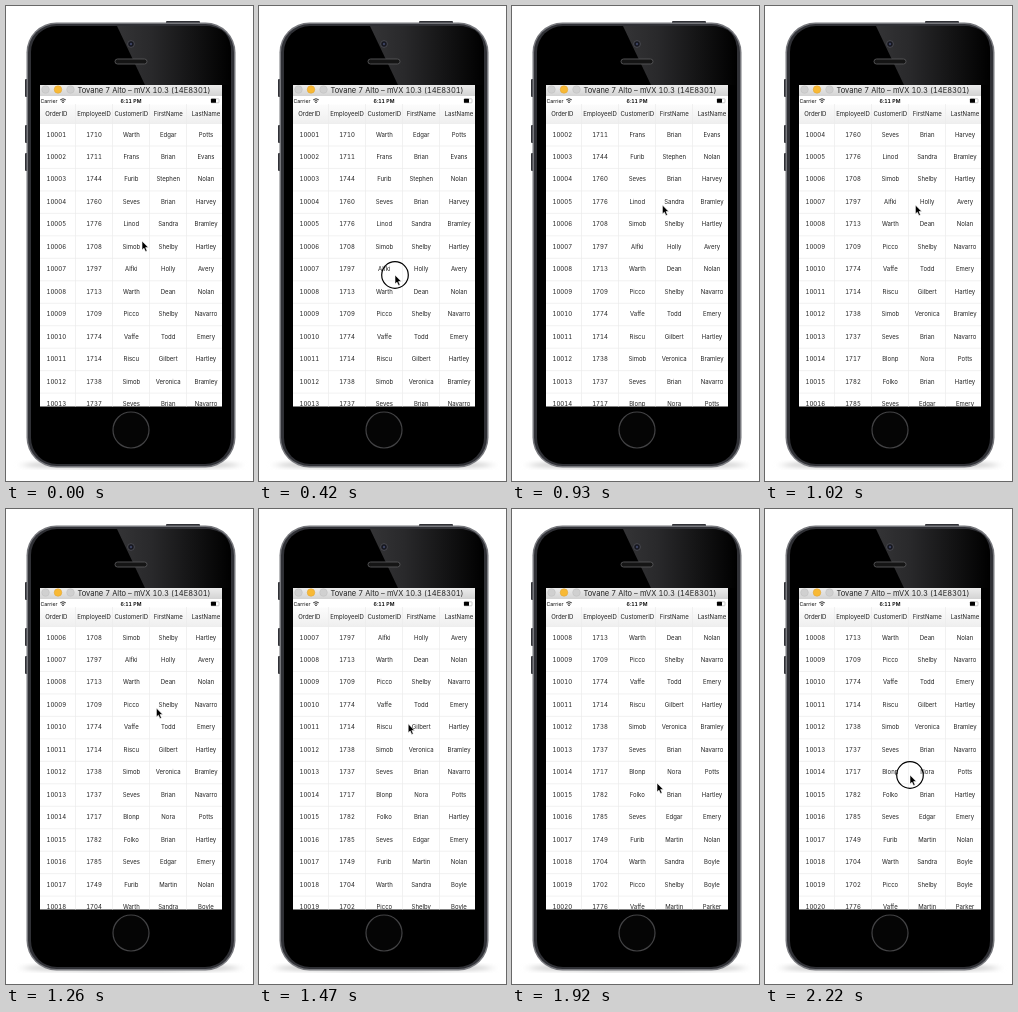
An HTML page for the animation above (2250 ms loop, 247x475 px).

```html
<!DOCTYPE html>
<html lang="en">
<head>
<meta charset="utf-8">
<style>
  html, body { margin: 0; width: 100%; height: 100%; overflow: hidden; background: #fff; }
  svg { display: block; }
  text { font: 6px Inter, Roboto, sans-serif; font-feature-settings: "tnum"; fill: #222; text-anchor: middle; }
  .title { font-size: 7.5px; }
  .status { font-size: 5.2px; fill: #000; }
  .clock { font-weight: 600; }
</style>
</head>
<body>
<svg width="247" height="475" viewBox="0 0 247 475">
  <defs>
    <linearGradient id="gloss">
      <stop offset="0" stop-color="#343436"/>
      <stop offset=".3" stop-color="#29292b"/>
      <stop offset="1" stop-color="#000"/>
    </linearGradient>
    <linearGradient id="bar" x2="0" y2="1">
      <stop offset="0" stop-color="#ececec"/>
      <stop offset="1" stop-color="#d3d3d3"/>
    </linearGradient>
    <linearGradient id="head" x2="0" y2="1">
      <stop offset="0" stop-color="#fcfcfc"/>
      <stop offset="1" stop-color="#efefef"/>
    </linearGradient>
    <filter id="soft"><feGaussianBlur stdDeviation=".7"/></filter>
    <filter id="shade"><feGaussianBlur stdDeviation="5 2"/></filter>
    <clipPath id="screen"><rect x="34" y="79" width="182" height="321.5"/></clipPath>
  </defs>

  <!-- phone body -->
  <ellipse cx="125" cy="459" rx="108" ry="4" fill="#ccc" filter="url(#shade)"/>
  <g filter="url(#soft)">
    <g fill="#303136">
      <rect x="19" y="73" width="4" height="18" rx="1"/>
      <rect x="19" y="119" width="4" height="18" rx="1"/>
      <rect x="19" y="147" width="4" height="18" rx="1"/>
      <rect x="160" y="15" width="34" height="4" rx="1"/>
    </g>
    <rect x="20.5" y="16.5" width="209" height="445" rx="30" fill="#77787d"/>
    <rect x="22" y="18" width="206" height="442" rx="28.5" fill="#303136"/>
    <rect x="25" y="20" width="200" height="438" rx="26" fill="#000"/>
  </g>
  <path d="M111 20H199Q225 20 225 46V79H139Z" fill="url(#gloss)"/>
  <circle cx="125" cy="38" r="3.4" fill="#16171f" stroke="#4a4a50"/>
  <circle cx="125" cy="38" r="1.2" fill="#3c4260"/>
  <rect x="109" y="53" width="32" height="5" rx="2.5" fill="#151515" stroke="#505052"/>
  <circle cx="125" cy="424" r="18" fill="#050505" stroke="#434345" stroke-width="1.2"/>

  <g clip-path="url(#screen)">
    <rect x="34" y="79" width="182" height="322" fill="#fff"/>
    <rect x="34" y="79" width="182" height="11" fill="url(#bar)"/>
    <g stroke="#bdbdbd" stroke-width=".5" fill="#d0d0d0">
      <circle cx="39.5" cy="83.5" r="3.8"/>
      <circle cx="52" cy="83.5" r="3.8" fill="#f8b935" stroke="#dda033"/>
      <circle cx="64.5" cy="83.5" r="3.8"/>
    </g>
    <text class="title" x="138" y="86.6">Tovane 7 Alto – mVX 10.3 (14E8301)</text>
    <text class="status" x="43" y="96.8">Carrier</text>
    <path d="M54.2 93.8Q57 91.7 59.8 93.8M55.4 95.2Q57 94 58.6 95.2" fill="none" stroke="#222" stroke-width=".9"/>
    <circle cx="57" cy="96.4" r=".7"/>
    <text class="status clock" x="125" y="96.8">6:11 PM</text>
    <rect x="205" y="92.8" width="8" height="4" rx=".6" fill="#fff" stroke="#999" stroke-width=".5"/>
    <rect x="205" y="92.8" width="5" height="4" rx=".6"/>
    <rect x="34" y="98.5" width="182" height="19" fill="url(#head)"/>
    <g id="grid" stroke="#ebebeb" stroke-width=".7"></g>
    <g id="cells"></g>
  </g>

  <circle id="ring" r="13.3" fill="none" stroke="#000" stroke-width="1.2"/>
  <path id="arrow" d="M0 0V9L2 7.2L3.5 10.6L5.1 9.9L3.6 6.6H6.4Z" fill="#000" stroke="#fff" stroke-width=".6"/>
</svg>
<script>
const $ = id => document.getElementById(id);
const add = (parent, tag, attrs) => {
  const el = document.createElementNS("http://www.w3.org/2000/svg", tag);
  for (const k in attrs) el.setAttribute(k, attrs[k]);
  return parent.appendChild(el);
};

const centers = [50.3, 88, 125.3, 162.2, 200];
const headers = ["OrderID", "EmployeeID", "CustomerID", "FirstName", "LastName"];
const pitch = 22.47, visible = 13;
const orders = `1710 Warth Edgar Potts
1711 Frans Brian Evans
1744 Furib Stephen Nolan
1760 Seves Brian Harvey
1776 Linod Sandra Bramley
1708 Simob Shelby Hartley
1797 Alfki Holly Avery
1713 Warth Dean Nolan
1709 Picco Shelby Navarro
1774 Vaffe Todd Emery
1714 Riscu Gilbert Hartley
1738 Simob Veronica Bramley
1737 Seves Brian Navarro
1717 Blonp Nora Potts
1782 Folko Brian Hartley
1785 Seves Edgar Emery
1749 Furib Martin Nolan
1704 Warth Sandra Boyle
1702 Picco Shelby Boyle
1776 Vaffe Martin Parker`.split("\n").map((line, i) => [10001 + i, ...line.split(" ")]);

for (const x of [69.5, 106.5, 143.5, 180.5]) add($("grid"), "path", { d: `M${x} 98V401` });
for (let i = 0; i <= visible; i++) add($("grid"), "path", { d: `M34 ${117.5 + i * pitch}H216` });

const textRow = y => centers.map(x => add($("cells"), "text", { x, y }));
textRow(110.4).forEach((el, i) => el.textContent = headers[i]);
const rows = Array.from({ length: visible }, (_, i) => textRow(130.5 + i * pitch));

// The list snaps one whole row at each of these times while the fling slows down.
const snaps = [900, 960, 1020, 1110, 1260, 1470, 1800];
// Pointer keys: time, x, y
const path = [
  [0, 136, 235], [240, 136, 273], [390, 136, 273], [420, 136, 269], [720, 140, 232],
  [930, 150.4, 199], [1410, 150.4, 199], [1680, 145, 270], [1920, 145, 274],
  [1980, 145, 274], [2220, 145, 266], [2250, 145, 266]
];

function pointer(t) {
  const i = path.findIndex(k => k[0] > t);
  const [t0, x0, y0] = path[i - 1], [t1, x1, y1] = path[i];
  const p = (t - t0) / (t1 - t0);
  return [x0 + (x1 - x0) * p, y0 + (y1 - y0) * p];
}

let shown = -1;
function draw(now) {
  const t = Math.floor(now % 2250 / 30) * 30;
  const first = snaps.filter(s => s <= t).length;
  if (first !== shown) {
    rows.forEach((row, r) => row.forEach((el, c) => el.textContent = orders[first + r][c]));
    shown = first;
  }
  const move = `translate(${pointer(t)})`;
  $("arrow").setAttribute("transform", move);
  $("ring").setAttribute("transform", move);
  const pressed = t >= 240 && t < 900 || t >= 2010;
  $("ring").setAttribute("visibility", pressed ? "visible" : "hidden");
}

const start = performance.now();
function tick() {
  draw(performance.now() - start);
  requestAnimationFrame(tick);
}
tick();
</script>
</body>
</html>
```
